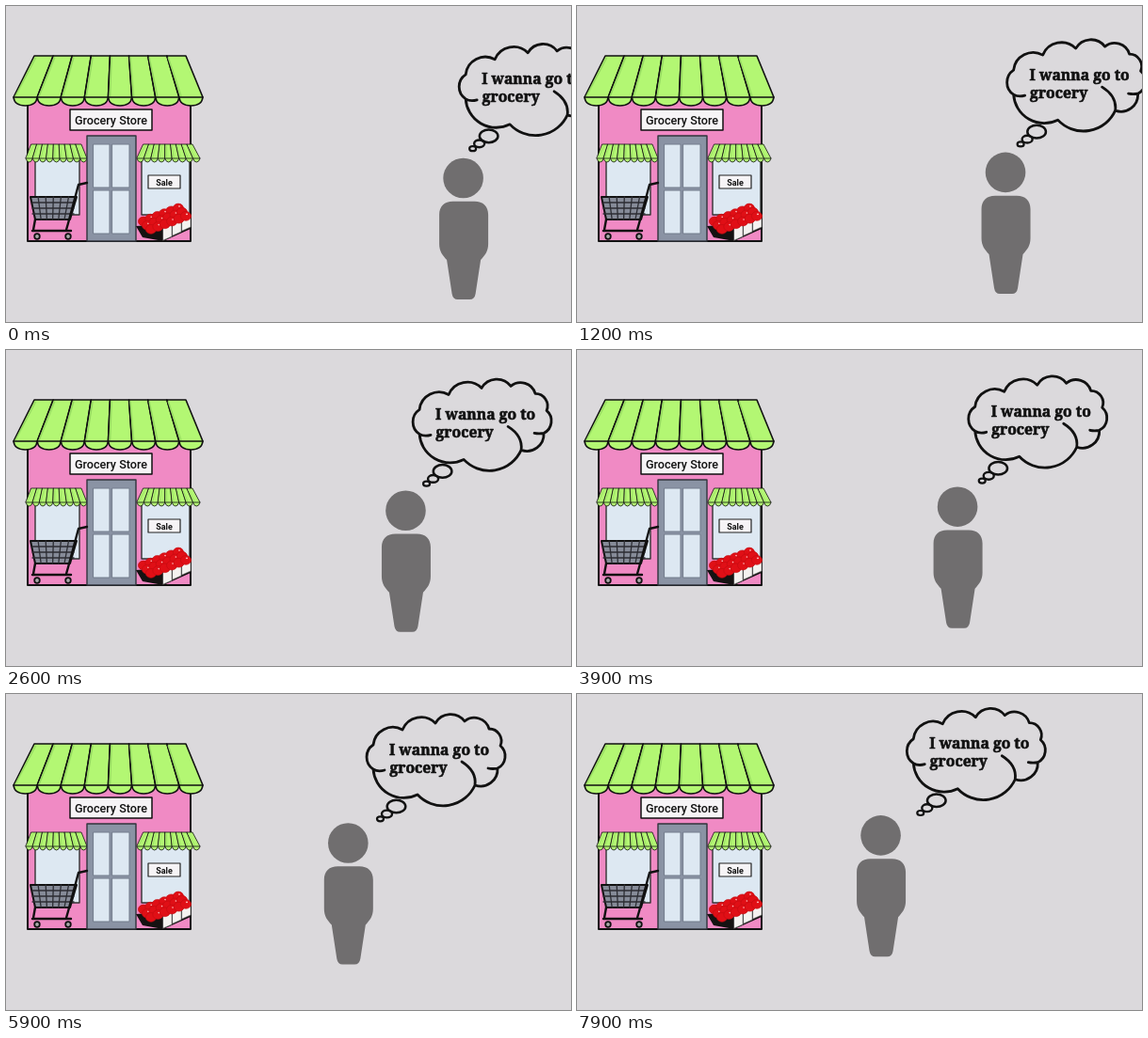
An HTML page with a canvas for the animation above (8 s loop, 600x336 px).

```html
<!DOCTYPE html>
<html lang="en">
<head>
<meta charset="utf-8">
<title>Going to the grocery</title>
<style>
html, body { margin: 0; width: 100%; height: 100%; overflow: hidden; background: #dbd9dc; }
canvas { display: block; width: 600px; height: 336px; }
</style>
</head>
<body>
<canvas id="stage" width="600" height="336"></canvas>
<script>
const ctx = document.getElementById('stage').getContext('2d');
const LOOP = 8000;
const INK = '#111', GLASS = '#dde8f2', LIME = '#b3f773';

function paint(path, fill, line, width = 1.5) {
  if (fill) { ctx.fillStyle = fill; ctx.fill(path); }
  if (line) { ctx.strokeStyle = line; ctx.lineWidth = width; ctx.stroke(path); }
}

function shape(d, fill, line, width) {
  paint(new Path2D(d), fill, line, width);
}

function box(x, y, w, h, fill, line, width) {
  const p = new Path2D();
  p.rect(x, y, w, h);
  paint(p, fill, line, width);
}

function oval(x, y, rx, ry, fill, line, width) {
  const p = new Path2D();
  p.ellipse(x, y, rx, ry, 0, 0, Math.PI * 2);
  paint(p, fill, line, width);
}

function label(text, x, y, font, align = 'left', heavy = 0) {
  ctx.font = font;
  ctx.textAlign = align;
  ctx.fillStyle = ctx.strokeStyle = INK;
  ctx.fillText(text, x, y);
  if (heavy) { ctx.lineWidth = heavy; ctx.strokeText(text, x, y); }
}

// Striped awning: top edge x1..x2, bottom edge x3..x4, scalloped hem
function awning(x1, x2, top, x3, x4, hem, count, drop, width) {
  const up = i => x1 + (x2 - x1) * i / count;
  const low = i => x3 + (x4 - x3) * i / count;
  for (let i = 0; i < count; i++) {
    const a = low(i), b = low(i + 1), m = (a + b) / 2;
    shape(`M${up(i)} ${top}L${up(i + 1)} ${top}L${b} ${hem}Q${b - 1} ${hem + drop} ${m} ${hem + drop}` +
      `Q${a + 1} ${hem + drop} ${a} ${hem}Z`, LIME, INK, width);
    shape(`M${up(i) + 1.5} ${top + 2}L${a + 2} ${hem - 1}`, null, '#98dc62', width);
  }
  shape(`M${x3} ${hem}H${x4}`, null, INK, width);
}

function cart() {
  shape('M26 203L75 203L68 227L31 227Z', '#868b98', INK, 2);
  for (let i = 1; i < 6; i++) shape(`M${26 + i * 8.1} 203L${31 + i * 6.2} 227`, null, '#2c2d33', 1.3);
  for (let y = 209; y < 226; y += 6) shape(`M28 ${y}H72`, null, '#2c2d33', 1.3);
  shape('M86 188L77 190L66 231L64 238M31 227L29 238M28 239H69', null, INK, 2.4);
  for (const x of [33, 66]) oval(x, 245, 2.8, 2.8, '#aaa', INK, 1.8);
}

function fruit() {
  shape('M138 234L145 246L167 250L196 237V224L166 232Z', '#151212');
  for (let i = 0; i < 3; i++) {
    const x = 167 + i * 10, y = 236 - i * 5;
    shape(`M${x} ${y}L${x + 9} ${y - 4}V${y + 9}L${x} ${y + 13}Z`, '#f4f2f0', '#777', 0.6);
  }
  for (let row = 0; row < 3; row++) {
    for (let i = 0; i < 6; i++) {
      const x = 146 + i * 7.4 + row * 4, y = 229 - i * 2.8 + row * 4.2;
      oval(x, y, 5.6, 4.9, '#e00f16', '#c20c12', 0.6);
      if ((i + row) % 2) oval(x + 1, y - 2, 1.1, 0.8, '#ffb4b4');
    }
  }
}

function store() {
  box(23, 95, 173, 155, '#f08ac4', INK, 2);
  awning(30, 191, 53, 8, 209, 97, 8, 9, 1.6);

  box(68, 110, 87, 22, '#f6f4f6', INK, 1.5);
  label('Grocery Store', 111.5, 126, '500 12.6px Roboto, sans-serif', 'center');

  box(31, 160, 47, 62, GLASS, '#333', 1.4);
  box(144, 160, 51, 62, GLASS, '#333', 1.4);
  awning(27, 80, 147, 21, 86, 162, 9, 4, 0.8);
  awning(146, 198, 147, 139, 206, 162, 9, 4, 0.8);
  box(151, 180, 34, 14, '#f6f4f6', '#222', 1.2);
  label('Sale', 168, 190.5, 'bold 9px Roboto, sans-serif', 'center');

  box(86, 138, 52, 112, '#8a93a4', '#30343c', 1.4);
  for (const y of [147, 196]) {
    box(93, y, 17, 46, GLASS, '#737c8c', 1);
    box(113, y, 18, 46, GLASS, '#737c8c', 1);
  }
  cart();
  fruit();
}

// Origin at the centre of the head
function person(x, y) {
  ctx.save();
  ctx.translate(x, y);
  const grey = '#706e6f';
  oval(0, 0, 21.3, 21.3, grey);
  shape('M-11 24.8H12C21 24.8 26.5 30 26.5 39V70C26.5 78 23 82 18.5 87L13 123' +
    'Q12 129 7 129H-6Q-11 129 -12 123L-17.5 87C-22 82 -25.5 78 -25.5 70V39C-25.5 30 -20 24.8 -11 24.8Z', grey);
  ctx.restore();
}

const cusps = [
  [390, 54], [421, 38], [456, 31], [487, 29], [513, 37], [525, 55], [522, 79],
  [498, 97], [437, 107], [390, 80], [390, 54]
];
let puff = 'M390 54';
for (let i = 1; i < cusps.length; i++) {
  const [ax, ay] = cusps[i - 1], [bx, by] = cusps[i];
  const r = Math.hypot(bx - ax, by - ay) * 0.6;
  puff += `A${r} ${r} 0 0 1 ${bx} ${by}`;
}
// Bump ends that curl into the cloud
const curls = 'M498 97Q500 82 484 72M522 79Q517 80 512 79M390 80Q395 83 402 81';

function thought(dx, dy) {
  ctx.save();
  ctx.translate(dx, dy);
  shape(puff + curls, null, INK, 2.8);
  oval(414.5, 119.5, 9.8, 6.8, null, INK, 2.5);
  oval(404.5, 127.5, 5.5, 3.9, null, INK, 2.4);
  oval(397.5, 132.8, 3.5, 2.5, null, INK, 2.2);
  const font = '900 15.7px "Noto Serif", serif';
  label('I wanna go to', 407, 64.5, font, 'left', 0.6);
  label('grocery', 407.5, 83.5, font, 'left', 0.6);
  ctx.restore();
}

// The walk advances one hard step each half second, after a late start
function stepAt(t) {
  if (t < 600) return 0;
  if (t < 1200) return 2;
  return Math.floor((t + 400) / 500);
}

function draw(t) {
  const n = stepAt(t);
  ctx.fillStyle = '#dbd9dc';
  ctx.fillRect(0, 0, 600, 336);
  store();
  person(485.6 - 10.19 * n, 183 - 2.04 * n);
  thought(8.18 * (12 - n), 1.57 * (12 - n));
}

ctx.lineJoin = 'round';
ctx.lineCap = 'round';
const start = performance.now();
function tick() {
  draw((performance.now() - start) % LOOP);
  requestAnimationFrame(tick);
}
tick();
</script>
</body>
</html>
```
